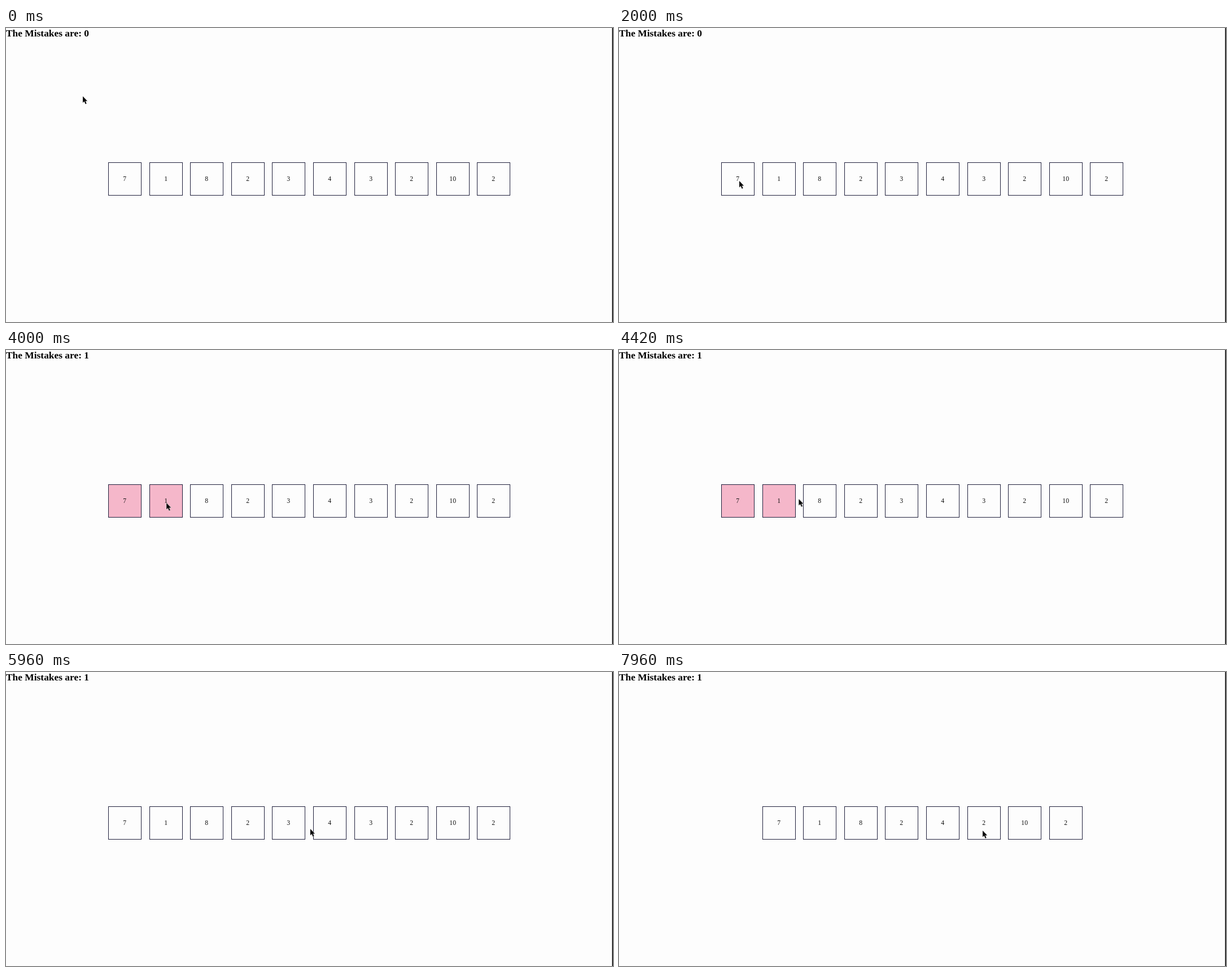
An HTML page for the animation above (7990 ms loop, 1075 by 521 pixels).

```html
<!DOCTYPE html>
<html lang="en">
<head>
<meta charset="utf-8">
<title>Matching numbers</title>
<style>
  html, body { margin: 0; width: 100%; height: 100%; overflow: hidden; background: #fdfdfd; }
  svg { display: block; width: 1075px; height: 521px; font: 11.7px "Liberation Serif", serif; fill: #111; }
  .title { font-size: 17.4px; font-weight: bold; fill: #000; }
  .cell { fill: #fdfdfd; stroke: #20203c; stroke-width: 1; }
  .num { text-anchor: middle; }
  .cursor { fill: #0a0a0a; stroke: #fff; stroke-width: 1; paint-order: stroke; stroke-linejoin: round; }

  .title, .row, .cell { animation: 7990ms step-end infinite; }
  .zero { animation-name: until-mistake; }
  .one { animation-name: from-mistake; }
  .full { animation-name: until-match; }
  .rest { animation-name: from-match; }
  .full .c0 { animation-name: pick-first; }
  .full .c1 { animation-name: pick-second; }
  .full .c4 { animation-name: pick-match; }
  .cursor { animation: move 7990ms linear infinite; }

  @keyframes until-mistake { 0% { visibility: visible } 42.43%, 100% { visibility: hidden } }
  @keyframes from-mistake { 0% { visibility: hidden } 42.43%, 100% { visibility: visible } }
  @keyframes until-match { 0% { visibility: visible } 90.86%, 100% { visibility: hidden } }
  @keyframes from-match { 0% { visibility: hidden } 90.86%, 100% { visibility: visible } }
  @keyframes pick-first { 0%, 71.96%, 100% { fill: #fdfdfd } 30.54% { fill: #f5b7ca } }
  @keyframes pick-second { 0%, 71.96%, 100% { fill: #fdfdfd } 42.43% { fill: #f5b7ca } }
  @keyframes pick-match { 0%, 100% { fill: #fdfdfd } 82.73% { fill: #f5b7ca } }

  @keyframes move {
    0%, 4.2% { transform: translate(136px, 121px); animation-timing-function: ease-in-out }
    10.51% { transform: translate(212px, 274px); animation-timing-function: step-end }
    12.51%, 34% { transform: translate(213px, 271px) }
    36.29%, 37.54% { transform: translate(256px, 275px); animation-timing-function: ease-out }
    38.67%, 49.8% { transform: translate(284px, 271px); animation-timing-function: ease-in }
    55.32% { transform: translate(318px, 264px) }
    59.7% { transform: translate(448px, 284px) }
    62.57% { transform: translate(521px, 289px) }
    63.5% { transform: translate(535px, 293px); animation-timing-function: ease-out }
    68.21%, 73.6% { transform: translate(560px, 277px) }
    74.59% { transform: translate(539px, 278px); animation-timing-function: ease-out }
    80.1%, 84.3% { transform: translate(502px, 274px); animation-timing-function: ease-in-out }
    88.74%, 99.2% { transform: translate(647px, 275px) }
    99.62%, 100% { transform: translate(644px, 281px) }
  }
</style>
</head>
<body>
<svg viewBox="0 0 1075 521">
  <text class="title zero" x="0" y="15">The Mistakes are: 0</text>
  <text class="title one" x="0" y="15">The Mistakes are: 1</text>
  <g class="row full"></g>
  <g class="row rest"></g>
  <rect x="1073.5" width="1.5" height="521" fill="#000"/>
  <path class="cursor" d="M0 0V11.5L2.6 9.1L4.6 13.8L6.7 12.9L4.7 8.4H8.2Z"/>
</svg>
<script>
  const PITCH = 72.6, LEFT = 181, TOP = 238, SIZE = 59;

  function fillRow(selector, numbers, firstSlot) {
    document.querySelector(selector).innerHTML = numbers.map((n, i) => {
      const x = Math.round(LEFT + (firstSlot + i) * PITCH);
      return `<rect class="cell c${i}" x="${x + 0.5}" y="${TOP + 0.5}" width="${SIZE - 1}" height="${SIZE - 1}"/>
        <text class="num" x="${x + SIZE / 2 - 0.3}" y="271">${n}</text>`;
    }).join('');
  }

  const numbers = [7, 1, 8, 2, 3, 4, 3, 2, 10, 2];
  fillRow('.full', numbers, 0);
  fillRow('.rest', numbers.filter(n => n !== 3), 1);
</script>
</body>
</html>
```
